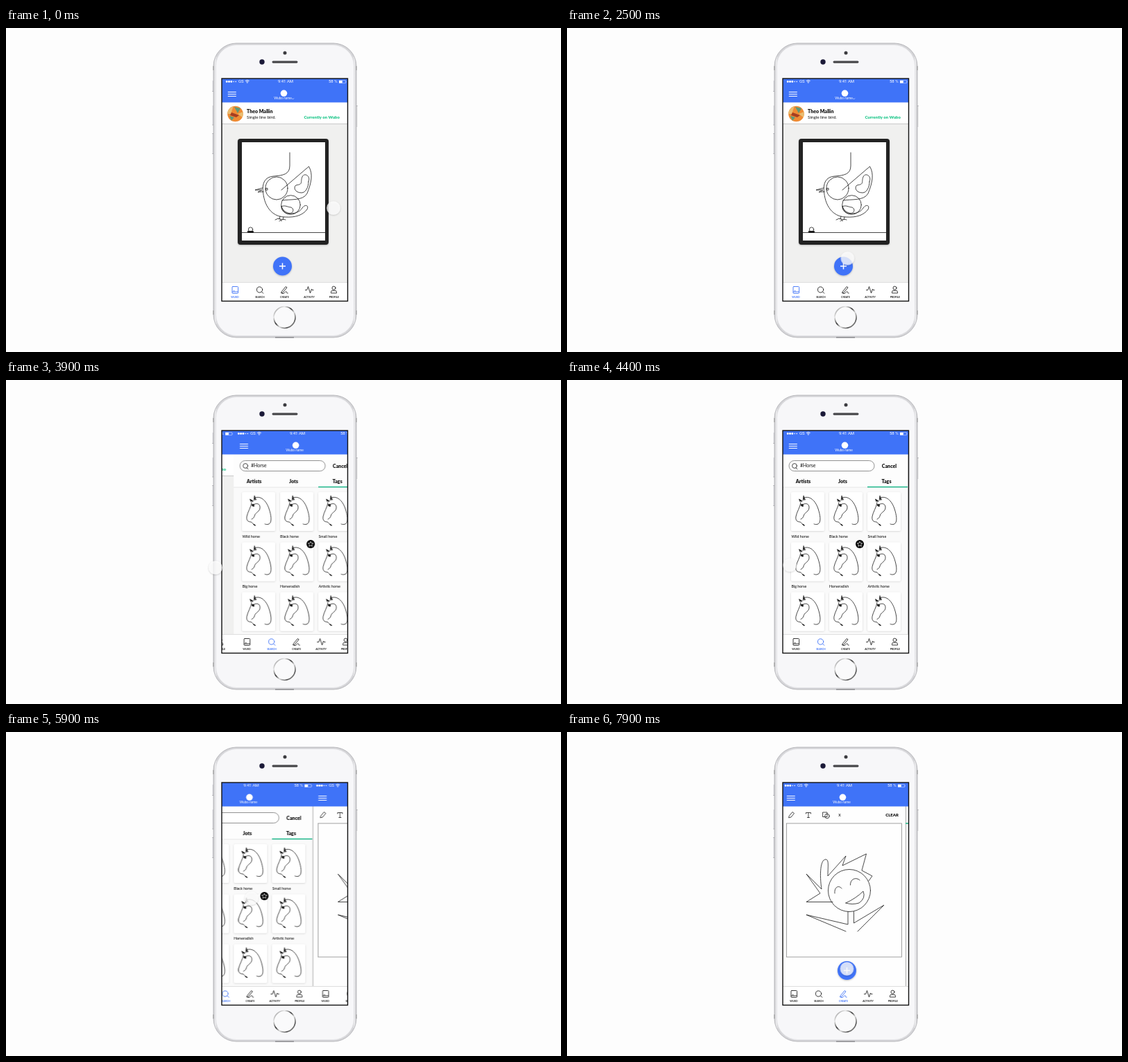
An HTML page for the animation above (8000 ms loop, 800x468 px).

```html
<!DOCTYPE html>
<html lang="en">
<head>
<meta charset="utf-8">
<title>Drawing app walkthrough</title>
<style>
  html, body { margin: 0; width: 100%; height: 100%; overflow: hidden; background: #fdfdfd; }
  svg { display: block; width: 800px; height: 468px; }
  text { font-family: Lato, "Open Sans", sans-serif; fill: #111; stroke: none; }
  .status text { font: 6px Roboto, Arial, sans-serif; fill: #fff; }
  .b { font-weight: 900; }
  .mid { text-anchor: middle; }
  .line { fill: none; stroke: #1a1a1a; stroke-width: .8; stroke-linecap: round; stroke-linejoin: round; }
  .nav text { font-size: 3.5px; font-weight: 700; text-anchor: middle; }
  .nav g { fill: none; stroke-width: .9; stroke-linecap: round; stroke-linejoin: round; }
  .label { font-size: 5.3px; font-weight: 500; }
  .tab { font-size: 7.1px; font-weight: 900; text-anchor: middle; }

  #pages { animation: slide 8s infinite; }
  #touch { animation: drag 8s infinite; }

  @keyframes slide {
    0%, 43.24% { transform: translateX(0); animation-timing-function: cubic-bezier(.65, 0, .35, 1); }
    50.92%, 70.6% { transform: translateX(-181px); animation-timing-function: cubic-bezier(.65, 0, .35, 1); }
    78.28%, 97.51% { transform: translateX(-361px); animation-timing-function: cubic-bezier(.333, 0, .667, 0); }
    100% { transform: translateX(-385.5px); }
  }
  @keyframes drag {
    0% { transform: translate(472px, 260px); animation-timing-function: ease-in-out; }
    11.25%, 29.5% { transform: translate(398px, 343px); animation-timing-function: ease-in; }
    31.25% { transform: translate(404px, 333px); animation-timing-function: ease-out; }
    36.25%, 39.5% { transform: translate(482px, 271px); animation-timing-function: ease-in-out; }
    48%, 52% { transform: translate(302px, 271px); animation-timing-function: ease-in-out; }
    64%, 68% { transform: translate(449px, 242px); animation-timing-function: ease-in; }
    73.75% { transform: translate(354px, 240px); animation-timing-function: ease-out; }
    78%, 81.5% { transform: translate(328px, 237px); animation-timing-function: ease-in-out; }
    96.25%, 100% { transform: translate(403.5px, 342px); }
  }
</style>
</head>
<body>
<svg viewBox="0 0 800 468">
  <defs>
    <clipPath id="screen"><rect x="311" y="73" width="182" height="322"/></clipPath>
    <clipPath id="round"><circle cx="330.5" cy="124" r="11.3"/></clipPath>
    <linearGradient id="rim">
      <stop offset="0" stop-color="#bfbfc2"/><stop offset=".012" stop-color="#ececee"/>
      <stop offset=".025" stop-color="#d4d4d7"/><stop offset=".975" stop-color="#d4d4d7"/>
      <stop offset=".988" stop-color="#ececee"/><stop offset="1" stop-color="#bfbfc2"/>
    </linearGradient>
    <linearGradient id="ring" x2="1" y2="1">
      <stop offset="0" stop-color="#777"/><stop offset=".25" stop-color="#e8e8e8"/>
      <stop offset=".45" stop-color="#333"/><stop offset=".6" stop-color="#ddd"/>
      <stop offset=".8" stop-color="#555"/><stop offset="1" stop-color="#ccc"/>
    </linearGradient>
    <filter id="soft" x="-30%" y="-30%" width="160%" height="170%">
      <feDropShadow dx="0" dy=".8" stdDeviation=".9" flood-opacity=".28"/>
    </filter>
    <filter id="card" x="-10%" y="-10%" width="120%" height="125%">
      <feDropShadow dx="0" dy=".7" stdDeviation=".9" flood-opacity=".16"/>
    </filter>

    <g id="header">
      <rect x="311" y="73" width="182" height="34.5" fill="#3f73f8"/>
      <g class="status" fill="#fff">
        <circle cx="318.2" cy="77.5" r="1.4"/><circle cx="321.5" cy="77.5" r="1.4"/><circle cx="324.8" cy="77.5" r="1.4"/>
        <circle cx="328.1" cy="77.5" r=".8"/><circle cx="331.2" cy="77.5" r=".8"/>
        <text x="335" y="78.9">GS</text>
        <path d="M345 76.4q2.8-2.2 5.6 0M346.2 77.8q1.6-1.3 3.2 0" fill="none" stroke="#fff" stroke-width=".9"/>
        <circle cx="347.8" cy="79" r=".7"/>
        <text x="403" y="78.9" class="mid">9:41 AM</text>
        <text x="465" y="78.9">58 %</text>
        <rect x="480" y="75.7" width="4.8" height="4"/>
        <path d="M484.8 75.700h4.700v4h-4.700M490.500 77v1.500" fill="none" stroke="#fff" stroke-width=".4"/>
      </g>
      <path d="M319.800 92.500h12M319.800 95.500h12M319.800 98.500h12" stroke="#fff"/>
      <circle cx="400.5" cy="94.3" r="4.8" fill="#fff"/>
      <text x="399" y="103.2" class="mid" font-size="4.8" style="fill:#fff">Wubo name</text>
    </g>

    <g id="nav" class="nav">
      <rect x="311" y="367" width="182" height="28" fill="#fff"/>
      <path d="M311 367.5h182" stroke="#dedede"/>
      <g style="stroke:var(--home,#222)">
        <rect x="326" y="373.5" width="8.6" height="9.8" rx="1"/><path d="M326.3 381h8M328 379.8h1.2"/>
        <text x="330" y="390.3" style="fill:var(--home,#222)">WUBO</text>
      </g>
      <g style="stroke:var(--search,#222)">
        <circle cx="365.6" cy="378" r="4.1"/><path d="M368.6 381l2.2 2.3"/>
        <text x="366" y="390.3" style="fill:var(--search,#222)">SEARCH</text>
      </g>
      <g style="stroke:var(--create,#222)">
        <path d="M397.5 380.5l5.8-7 1.7 1.4-5.8 7-2.3.8zM398 383.5c4 1 4-3.5 6-2.8 1.5.6-.5 2.8 2.2 2.4"/>
        <text x="401.5" y="390.3" style="fill:var(--create,#222)">CREATE</text>
      </g>
      <g style="stroke:#222">
        <path d="M431.5 378.5h2.2l1.8-5 3 9.5 2-6 1 1.5h1.5"/>
        <text x="437" y="390.3">ACTIVITY</text>
      </g>
      <g style="stroke:#222">
        <circle cx="472.5" cy="375.6" r="2.5"/><path d="M468.5 382.5v-1.2q0-2 2.4-2h3.2q2.4 0 2.4 2v1.2z"/>
        <text x="472.7" y="390.3">PROFILE</text>
      </g>
    </g>

    <g id="add">
      <circle r="13.5" fill="#3f73f8" filter="url(#soft)"/>
      <path d="M-4.5 0h9M0-4.5v9" stroke="#fff" stroke-width="1.5"/>
    </g>

    <g id="horse">
      <rect width="48" height="56" rx="2" fill="#fff" filter="url(#card)"/>
      <g class="line">
        <path d="M19 8C27 5 35 12 39 24C42 33 43 41 40.500 44.500C39 47 35 47 33 46"/>
        <path d="M13 14L11.500 10 16 13M17 12L18 5 20.500 11"/>
        <path d="M14 15C13 22 8 29 7 35C6 41 9 43 13 43C15 44 16 46 18 48"/>
        <path d="M15 19C20 15 26 16 26 22C26 28 20 29 18.500 33C17.500 37 16 38 14 39"/>
        <path d="M14.500 18h2.500v2.200l-2-.6zM12.500 11.500l2.500 1.500M18 8l1 3M17 46.500l2 1.500" stroke-width="1.500"/>
      </g>
    </g>
    <g id="cards">
      <use href="#horse" x="323"/><use href="#horse" x="378"/><use href="#horse" x="433"/>
    </g>
  </defs>

  <!-- handset -->
  <path d="M298.300 76v16M298.300 112v28M298.300 152v30M505.700 112v31" stroke="#d6d6d9" stroke-width="1.400"/>
  <path d="M297.500 91.500h2M297.500 140h2M297.500 152.500h2M297.500 181.500h2M504.500 112.500h2" stroke="#99999d"/>
  <rect x="299" y="22" width="206" height="425" rx="33" fill="url(#rim)" stroke="#b9b9bd"/>
  <rect x="302.500" y="24.500" width="199" height="420" rx="30" fill="#f7f7f9" stroke="#e4e4e7"/>
  <path d="M299 55v6M505 55v6M299 408v6M505 408v6" stroke="#aaa" stroke-width="1.5"/>
  <path d="M388 447h27" stroke="#8e8e92" stroke-width="1.5"/>
  <circle cx="402" cy="36" r="2.500" fill="#3c3c40"/>
  <circle cx="369" cy="49" r="3.700" fill="#1b1a38"/>
  <rect x="383.500" y="47.500" width="37" height="3.200" rx="1.600" fill="#48484b"/>
  <circle cx="401.500" cy="418" r="15.500" fill="#fafafb" stroke="url(#ring)" stroke-width="1.700"/>

  <g clip-path="url(#screen)">
    <g id="pages">
      <!-- home -->
      <g style="--home:#3f73f8">
        <rect x="311" y="107" width="181" height="261" fill="#f0f0ef"/>
        <rect x="311" y="107" width="181" height="31" fill="#fff"/>
        <path d="M311 138.500h181" stroke="#c9c9c9"/>
        <use href="#header"/>
        <path d="M412 101.500l1.500 1.500 1.500-1.500" fill="none" stroke="#fff" stroke-width=".6"/>
        <g clip-path="url(#round)">
          <rect x="319" y="112" width="23" height="24" fill="#ef8b34"/>
          <path d="M319 112h9l-4 12h-5zM334 124l8-3v9z" fill="#e9bd72"/>
          <path d="M329 114l9 2-4 7zM322 127l7 2-4 5z" fill="#5d9a7a"/>
          <path d="M325 122l11 4-4 3-9-3z" fill="#a63e22"/>
        </g>
        <text x="347" y="123" class="b" font-size="7">Theo Mallin</text>
        <text x="347" y="131" font-size="6.300">Single line bird.</text>
        <text x="481" y="131" class="b" font-size="6" text-anchor="end" style="fill:#1fc78b">Currently on Wubo</text>
        <rect x="334" y="160" width="131" height="153" rx="4" fill="#222" filter="url(#soft)"/>
        <rect x="340" y="165" width="120" height="142" fill="#fff"/>
        <g class="line">
          <path d="M340 295.500h120"/>
          <circle cx="352.500" cy="291" r="3.200"/>
          <path d="M348.500 293.500h8v2h-8z" fill="#111"/>
          <path d="M409 180V199C409 211 400 213 386 214C373 215 369 224 370.500 237C373 262 387 273 402 273C418 274 428 270 434 262C437 256 431 254 427 260C420 271 400 271 397 257"/>
          <ellipse cx="390" cy="231.500" rx="16" ry="16.500"/>
          <circle cx="410.500" cy="255.500" r="13.800"/>
          <path d="M397 234L436.500 200C443 211 440 224 434 239C428 250 410 247 398 249"/>
          <path d="M436 222C440 214 430 208 427 215C424 222 429 226 418 227C414 230 416 238 426 238C432 238 436 230 436 222"/>
          <path d="M397 258C402 255 406 259 411 259C417 262 413 270 405 268C399 266 397 262 397 258"/>
          <path d="M370 231L359 234H369L363 237 371 236.500M374.500 231.500h2.500v2.500h-2.500zM395 272l-1 4M400 273l-1 4M388 277q4-3 8-1l1 3M394 279q4-4 9-2"/>
        </g>
        <use href="#add" x="398.500" y="344"/>
        <use href="#nav"/>
      </g>

      <!-- search -->
      <g transform="translate(181)" style="--search:#3f73f8">
        <rect x="311" y="107" width="181" height="261" fill="#fafafa"/>
        <rect x="311" y="107" width="181" height="48" fill="#fdfdfd"/>
        <path d="M311 155h181" stroke="#e8e8e8"/>
        <path d="M433 154.500h59" stroke="#1fb88a" stroke-width="1.500"/>
        <use href="#header"/>
        <rect x="320" y="116.500" width="123" height="15" rx="7.500" fill="#fff" stroke="#777" stroke-width=".8"/>
        <path d="M330 127l2 2" class="line"/><circle cx="328" cy="124" r="3.400" class="line"/>
        <text x="336" y="126.300" font-size="7">#Horse</text>
        <text x="464.500" y="127" class="tab">Cancel</text>
        <text x="340.500" y="148.500" class="tab">Artists</text>
        <text x="397.500" y="148.500" class="tab">Jots</text>
        <text x="460.500" y="148.500" class="tab">Tags</text>
        <use href="#cards" y="162"/><use href="#cards" y="234.500"/><use href="#cards" y="306.500"/>
        <g class="label">
          <text x="323.500" y="227.500">Wild horse</text><text x="378" y="227.500">Black horse</text><text x="433.500" y="227.500">Small horse</text>
          <text x="323.500" y="300">Big horse</text><text x="378" y="300">Horseradish</text><text x="433.500" y="300">Artistic horse</text>
        </g>
        <circle cx="422" cy="237" r="6" fill="#000"/>
        <path d="M422 233.200l1.100 2.500 2.700.2-2.100 1.800.7 2.600-2.400-1.400-2.400 1.400.7-2.600-2.100-1.800 2.700-.2z" fill="none" stroke="#fff" stroke-width=".7"/>
        <use href="#nav"/>
      </g>

      <!-- create -->
      <g transform="translate(361)" style="--create:#3f73f8">
        <rect x="311" y="107" width="181" height="261" fill="#fefefe"/>
        <path d="M312 107v261" stroke="#999" stroke-width=".8"/>
        <use href="#header"/>
        <g class="line">
          <path d="M323.500 121l4.500-5.500 2.500 2-4.500 5.500-3 .8zM372 116h6v6.500h-6z"/>
          <path d="M347.500 118v-1.500h7v1.500M351 116.500v7M349.500 123.500h3"/>
          <circle cx="378" cy="121.500" r="3.300"/>
        </g>
        <text x="396" y="122" class="mid" font-size="7">x</text>
        <text x="481" y="121.700" class="b" font-size="6" text-anchor="end">CLEAR</text>
        <rect x="319.500" y="132" width="166" height="193" fill="none" stroke="#888" stroke-width=".8"/>
        <g class="line">
          <circle cx="410" cy="229" r="30.500"/>
          <path d="M386 245.500H348L368 233 348 205 370 227C367 206 368 184 376 184C381 184 379 195 379 208L405 179 400 193 434.500 176 428 200 443 208 438 215"/>
          <path d="M389 233C388 225 394 220 399 226M411.500 221C411 212 420 209 425 214M405 247Q420 240 430 230Q434 240 424 247Q414 250 405 247z"/>
          <path d="M408 259.500V278L348 264 405 288M416.500 259.500V276L460 250 422 288"/>
        </g>
        <use href="#add" x="406.500" y="344.500"/>
        <use href="#nav"/>
      </g>

      <!-- following page -->
      <g transform="translate(541)">
        <rect x="311" y="107" width="181" height="261" fill="#fdfdfd"/>
        <path d="M311.500 107v261" stroke="#999" stroke-width=".8"/>
        <path d="M311 132h60" stroke="#1fb88a" stroke-width="1.500"/>
        <use href="#header"/><use href="#nav"/>
      </g>
    </g>
  </g>
  <rect x="311" y="73" width="181.500" height="321.500" fill="none" stroke="#111" stroke-width="1.400"/>

  <g id="touch"><circle r="9.800" fill="#fff" fill-opacity=".76" filter="url(#soft)"/></g>
</svg>
</body>
</html>
```
